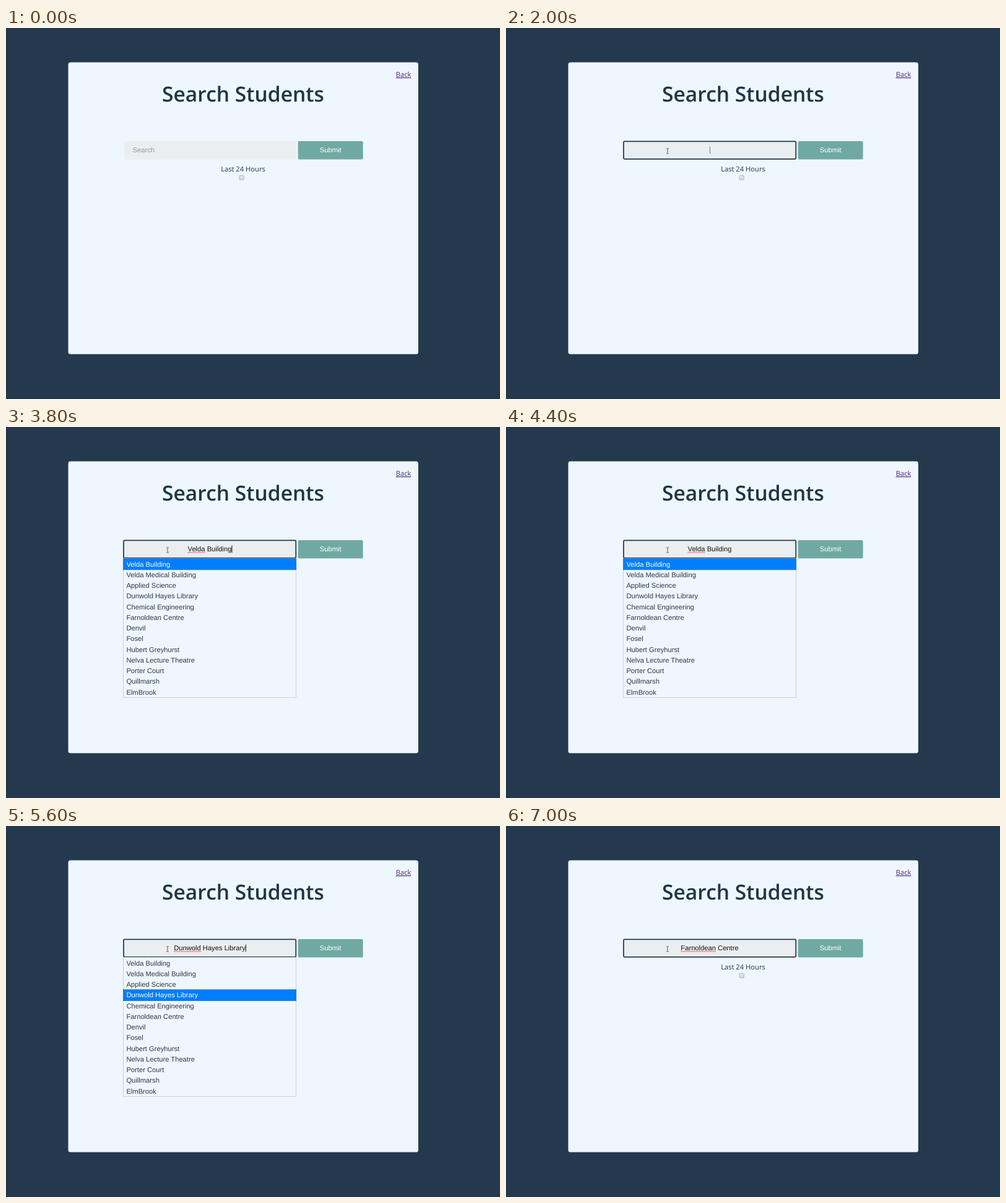
Write an HTML page that moves like this. It is 798 px wide and 600 px high and loops after 7100 ms.

```html
<!DOCTYPE html>
<html lang="en">
<head>
<meta charset="utf-8">
<title>Search Students</title>
<style>
  html, body { margin: 0; width: 100%; height: 100%; overflow: hidden; background: #24394d; }
  svg { display: block; text-rendering: geometricPrecision; }
  text { font: 11.2px "Liberation Sans", Arial, sans-serif; fill: #33383d; white-space: pre; }
  .open { font-family: "Open Sans", sans-serif; fill: #1f3644; }
  .mid { text-anchor: middle; }
  #title { font-size: 33.6px; font-weight: 600; }
  #back { fill: #4f2a7d; text-decoration: underline; }
  #hint { fill: #92979b; }
  #value { fill: #111; }
  .submit { fill: #fff; }
</style>
</head>
<body>
<svg width="798" height="600" viewBox="0 0 798 600">
  <defs>
    <linearGradient id="box" x2="0" y2="1">
      <stop stop-color="#e4e8ec"/><stop offset="1" stop-color="#d3d8dd"/>
    </linearGradient>
  </defs>
  <rect width="798" height="600" fill="#24394d"/>
  <rect x="100.5" y="55.5" width="565.5" height="472" rx="3.5" fill="#eef6fe"/>
  <text id="back" class="open" x="629.7" y="79">Back</text>
  <text id="title" class="open mid" x="383" y="118.5">Search Students</text>

  <rect id="field" x="191" y="183" width="278" height="29.5" rx="2" fill="#ebeef0"/>
  <rect id="focus" x="190" y="183.4" width="278.3" height="28.4" rx="1.5" fill="#ebeef0" stroke="#24394d" stroke-width="1.8"/>
  <text id="hint" x="204.6" y="201">Search</text>
  <text id="value" class="mid" x="329" y="201"></text>
  <path id="spell" stroke="#e33" stroke-width="1" stroke-dasharray="2 .6"/>
  <rect id="caret" y="191.5" width="1" height="12" fill="#111"/>

  <rect x="471.7" y="183" width="105" height="29.5" rx="2" fill="#70a9a1"/>
  <text class="submit mid" x="524.2" y="201">Submit</text>
  <text class="open mid" x="383" y="231.5">Last 24 Hours</text>
  <rect x="377" y="238.4" width="7.2" height="7.2" rx="1.3" fill="url(#box)" stroke="#a4a9ae" stroke-width=".8"/>

  <g id="list">
    <rect x="189.5" y="212.5" width="279" height="225" fill="#eef6fe" stroke="#c9d2dd"/>
    <rect id="bar" x="189.4" width="279.4" height="18" fill="#007dff" stroke="#0b66cc" stroke-width=".6"/>
  </g>

  <path id="arrow" d="M0 0V11.5L2.7 9L4.5 13L6.2 12.2L4.5 8.4H8.2Z" fill="#fff" stroke="#222" stroke-width=".8"/>
  <path id="beam" d="M-2 -4H-.6L0 -3.5L.6 -4H2M0 -3.5V3.5M-2 4H-.6L0 3.5L.6 4H2" fill="none" stroke="#4a4d50" stroke-width=".9"/>
</svg>
<script>
const $ = id => document.getElementById(id);
const LOOP = 7100, FOCUS = 1700, OPEN = 2800, CLOSE = 6500, BLINK = 500;
const items = ["Velda Building", "Velda Medical Building", "Applied Science",
  "Dunwold Hayes Library", "Chemical Engineering", "Farnoldean Centre", "Denvil",
  "Fosel", "Hubert Greyhurst", "Nelva Lecture Theatre", "Porter Court",
  "Quillmarsh", "ElmBrook"];
const unknownWords = ["Velda", "Dunwold", "Farnoldean"];
const picks = [3800, 4600, 5000, 5400, 5800, 6200]; // when each item is chosen
const rowY = i => 212.9 + 17.25 * i;

const rows = items.map((name, i) => {
  const row = document.createElementNS("http://www.w3.org/2000/svg", "text");
  row.setAttribute("x", 194.4);
  row.setAttribute("y", rowY(i) + 12.7);
  row.textContent = name;
  return $("list").appendChild(row);
});

const show = (id, on) => { $(id).style.display = on ? "" : "none"; };

function drawCursor(t) {
  const p = Math.min(1, (t - 100) / 700), rest = (1 - p) ** 3;
  const x = 261 + 389 * rest, y = 199 + 139 * rest;
  const inField = x > 191 && x < 469 && y > 183 && y < 212;
  show("arrow", t >= 100 && !inField);
  show("beam", t >= 100 && inField);
  for (const id of ["arrow", "beam"]) $(id).setAttribute("transform", `translate(${x} ${y})`);
}

function drawValue(t, pick) {
  const value = pick < 0 ? "" : items[pick], word = value.split(" ")[0];
  const text = $("value");
  if (text.textContent !== value) text.textContent = value;
  const width = value ? text.getComputedTextLength() : 0, left = 329 - width / 2;
  const wrong = unknownWords.includes(word);
  show("spell", wrong);
  if (wrong) $("spell").setAttribute("d", `M${left} 203h${text.getSubStringLength(0, word.length)}`);

  const since = t - (pick < 0 ? (t < OPEN ? FOCUS : OPEN) : picks[pick]);
  show("caret", since >= 0 && Math.floor(since / BLINK) % 2 === 0);
  $("caret").setAttribute("x", 329 + width / 2);
  $("caret").setAttribute("opacity", value ? 1 : .55);
}

function draw(now) {
  const t = Math.floor(now % LOOP / 100) * 100;
  const pick = picks.filter(start => start <= t).length - 1;
  show("field", t < FOCUS);
  show("hint", t < FOCUS);
  show("focus", t >= FOCUS);
  show("list", t >= OPEN && t < CLOSE);
  show("bar", pick >= 0);
  $("bar").setAttribute("y", rowY(Math.max(pick, 0)));
  rows.forEach((row, i) => { row.style.fill = i === pick ? "#fff" : ""; });
  drawValue(t, pick);
  drawCursor(t);
}

const start = performance.now();
(function tick() {
  draw(performance.now() - start);
  requestAnimationFrame(tick);
})();
</script>
</body>
</html>
```
